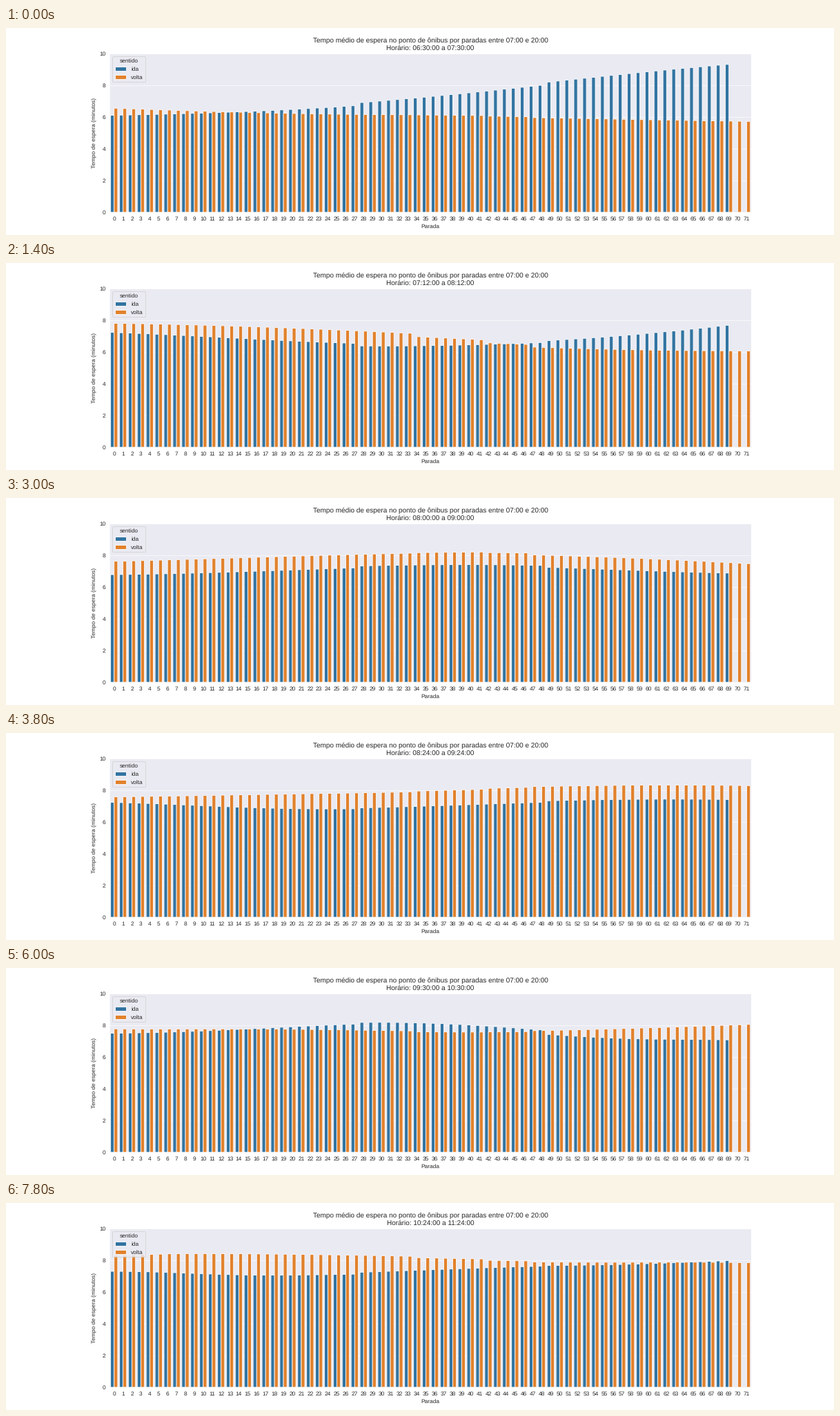
Write a matplotlib script that moves like this. It is 1200 px wide and 300 px high and loops after 8 s.

```python
import numpy as np
import matplotlib.pyplot as plt
from matplotlib.animation import FuncAnimation

FRAMES, INTERVAL = 40, 200

plt.rcParams.update({
    "font.family": "Liberation Sans",
    "text.hinting": "none",
    "text.color": ".15",
    "axes.labelcolor": ".15",
    "xtick.color": ".15",
    "ytick.color": ".15",
    "axes.facecolor": "#EAEAF2",
    "axes.edgecolor": "white",
    "grid.color": "white",
    "axes.axisbelow": True,
})

# Turning points of each wave: departure frame, then the waiting time
# it causes at the first and at the last stop.
IDA = [(-12, 6.5, 9.4), (1, 6.1, 6.7), (8.5, 7.35, 7.45), (15.5, 6.77, 6.92),
       (19.5, 7.25, 7.1), (24.8, 8.13, 8.25), (30, 7.5, 7.75),
       (36.5, 7.03, 7.15), (39, 7.3, 7.3)]
VOLTA = [(-12, 6.1, 5.72), (-4, 6.2, 6.07), (9.5, 7.95, 8.4), (16, 7.6, 8.2),
         (24, 7.55, 7.58), (29, 7.75, 7.9), (38, 8.42, 8.4), (39, 8.3, 8.4)]


class Direction:
    """Waves of waiting time that travel along the line with the buses."""

    def __init__(self, keys, stops, pace, slow_legs):
        self.start, self.near, self.far = np.array(keys).T
        self.stop = np.arange(stops)
        self.delay = self.stop / pace
        for stop, extra in slow_legs:
            self.delay += extra * (self.stop >= stop)

    def heights(self, frame):
        order = np.arange(len(self.start))
        pos = np.interp(frame - self.delay, self.start, order)
        part = pos % 1
        pos += (1 - np.cos(np.pi * part)) / 2 - part
        near = np.interp(pos, order, self.near)
        far = np.interp(pos, order, self.far)
        return near + (far - near) * self.stop / 71


def heading(frame):
    hour = (70 + frame) / 10  # centre of the one-hour window
    mid = int(hour) * 60 + int(hour % 1 * 60)
    start, end = (f"{m // 60:02d}:{m % 60:02d}:00" for m in (mid - 30, mid + 30))
    return ("Tempo médio de espera no ponto de ônibus por paradas "
            f"entre 07:00 e 20:00\nHorário: {start} a {end}")


fig, ax = plt.subplots(figsize=(20, 5), dpi=60)
fig.subplots_adjust(left=.1252, right=.9, bottom=.11, top=.877)


def add_bars(direction, offset, color, label):
    bars = ax.bar(direction.stop + offset, direction.heights(0), .4,
                  color=color, edgecolor="white", linewidth=1, label=label)
    for bar in bars:
        bar.set_snap(False)
    return direction, bars


groups = [
    add_bars(Direction(IDA, 70, 7.2, [(28, 1.1), (49, .8)]),
             -.2, "#3274a1", "ida"),
    add_bars(Direction(VOLTA, 72, 8, [(34, .8), (42, .8), (47, .9)]),
             .2, "#e1812c", "volta"),
]

ax.set_xlim(-.5, 71.5)
ax.set_ylim(0, 10)
ax.set_xticks(range(72))
ax.set_yticks(range(0, 11, 2))
ax.tick_params(length=0, pad=7, labelsize=10)
ax.grid(axis="y", linewidth=.8)
ax.set_xlabel("Parada", fontsize=10, labelpad=5)
ax.set_ylabel("Tempo de espera (minutos)", fontsize=10)
title = ax.set_title(heading(0), fontsize=12)
ax.legend(title="sentido", loc="upper left", fontsize=10, title_fontsize=10,
          framealpha=.8, edgecolor=".8")


def draw(frame):
    title.set_text(heading(frame))
    for direction, bars in groups:
        for bar, height in zip(bars, direction.heights(frame)):
            bar.set_height(height)
    return [title]


anim = FuncAnimation(fig, draw, frames=FRAMES, interval=INTERVAL,
                     repeat=True, repeat_delay=0, blit=False)
plt.show()
```
